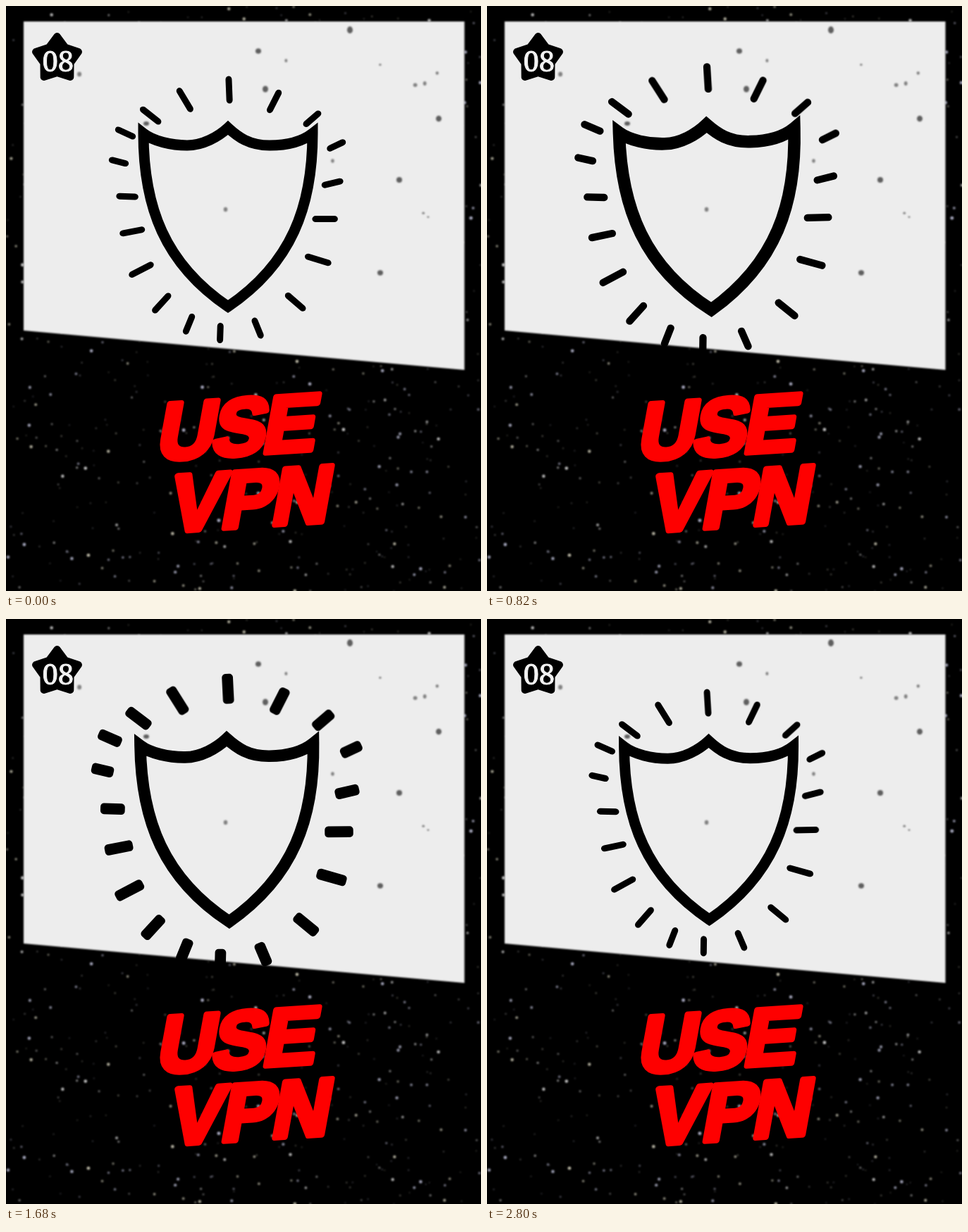
An HTML page that plays this animation: 674 px wide and 831 px high, repeating every 2.82 s.

```html
<!DOCTYPE html>
<html lang="en">
<head>
<meta charset="utf-8">
<title>Use VPN</title>
<style>
  html, body { margin: 0; width: 100%; height: 100%; overflow: hidden; background: #000; }
  svg { display: block; width: 674px; height: 831px; }
  .soft { filter: blur(.8px); }
  .badge { font: 40px "Noto Serif", "Liberation Serif", serif; fill: #f2f2f2; stroke: #f2f2f2; }
  .title text {
    font: bold 114px "Liberation Sans", Arial, sans-serif;
    letter-spacing: -4px; font-kerning: none;
    fill: #fe0000; stroke: #fe0000; stroke-width: 8; stroke-linejoin: round;
  }
</style>
</head>
<body>
<svg viewBox="0 0 674 831">
  <rect width="674" height="831"/>
  <g id="stars" class="soft"></g>
  <path class="soft" fill="#ededed" d="M25 22H650.5V517L25 461Z"/>
  <g id="specks" class="soft"></g>
  <path id="badge" stroke="#000" stroke-width="10" stroke-linejoin="round"/>
  <text class="badge" x="51.5" y="92.5">08</text>
  <path id="shield" fill="none" stroke="#000" d="
    M195 181C209 192 235 198 257 198S301 186 315 173C329 186 345 198 374 198S421 192 435 181
    C435 285 405 366 315 427C225 366 195 285 195 181Z"/>
  <g id="rays"></g>
  <g class="title">
    <text transform="translate(211 645) rotate(-3.7) skewX(-14)">USE</text>
    <text transform="translate(228 747) rotate(-3.7) skewX(-14)">V<tspan dx="2">PN</tspan></text>
  </g>
</svg>
<script>
const byId = id => document.getElementById(id);

function add(parent, tag, attrs) {
  const el = document.createElementNS('http://www.w3.org/2000/svg', tag);
  for (const k in attrs) el.setAttribute(k, attrs[k]);
  return parent.appendChild(el);
}

let seed = 4711;
const rnd = (from = 0, to = 1) =>
  from + (to - from) * (seed = seed * 16807 % 2147483647) / 2147483647;

// Night sky: many faint dots, few bright ones
const tints = ['#fff', '#f4f0d8', '#d6d8f4'];
for (let i = 0; i < 800; i++) {
  const glow = rnd() ** 2;
  add(byId('stars'), 'circle', {
    cx: rnd(0, 674), cy: rnd(0, 831), r: 1.2 + 1.3 * glow,
    opacity: .15 + .6 * glow, fill: tints[i % 3]
  });
}

// Dust on the card
function speck(x, y, size, opacity) {
  add(byId('specks'), 'ellipse', { cx: x, cy: y, rx: size, ry: size * rnd(.7, 1.3), opacity });
}
[[488, 34], [358, 64], [368, 118], [199, 167], [558, 247], [614, 160], [531, 379]]
  .forEach(([x, y]) => speck(x, y, 4, .6));
for (let i = 0; i < 12; i++) speck(rnd(60, 630), rnd(50, 450), rnd(1.5, 3), .45);

// Badge
byId('badge').setAttribute('d', 'M' + Array.from({ length: 10 }, (_, i) => {
  const r = i % 2 ? 20 : 32, a = Math.PI * i / 5;
  return [72.5 + r * Math.sin(a), 75 - r * Math.cos(a)];
}).join('L') + 'Z');

// Rays: spread around the shield, bulging at its upper corners; angles run clockwise from the top
const { sin, cos, PI } = Math;
const CX = 315, CY = 292, COUNT = 19, DEG = PI / 180;
const rays = Array.from({ length: COUNT }, (_, i) => {
  const even = 2 * PI * i / COUNT;
  const a = even + (6 - 6 * cos(even - 24 * DEG) + 4.5 * sin(3 * even)) * DEG;
  const fromTop = Math.acos(cos(a)) / DEG;
  const r = 155 + 18 * cos(2 * a) + 34 * Math.exp(-(((fromTop - 56) / 20) ** 2));
  const lean = a + (10 * sin(2 * a) - 3) * DEG;
  const len = 25 + 5 * cos(PI * i / 3);
  return {
    x: r * sin(a), y: -r * cos(a), dx: len * sin(lean), dy: -len * cos(lean),
    el: add(byId('rays'), 'rect', { rx: 5 })
  };
});

// Smooth rise and fall between two steps
function pulse(step, from, to) {
  const k = Math.min(1, Math.max(0, (step - from) / (to - from)));
  return sin(PI * k) ** 2;
}

// Steps come in threes, held for 20, 100 and 20 ms
function stepAt(t) {
  const r = t % 140;
  return Math.floor(t / 140) * 3 + (r < 20 ? 0 : r < 120 ? 1 : 2);
}

function drawShield(step) {
  const beat = pulse(step, 5, 45);
  const k = Math.max(0, (step - 5) / 12);
  const turn = -1.5 * k * Math.exp(1 - k);
  byId('shield').setAttribute('stroke-width', 15 + 3 * beat);
  byId('shield').setAttribute('transform',
    `translate(315 303) rotate(${turn}) scale(${1 + .055 * beat}) translate(-315 -303)`);
}

function drawRays(step) {
  const grow = .265 * pulse(step, 8, 46);
  const sx = 1 + grow, sy = 1 + .8 * grow;
  const width = 9 + 8 * pulse(step, 12, 50);
  const turn = -.6 * (1 - cos(2 * PI * (step / 31) ** 1.42)); // a wobble that quickens
  byId('rays').setAttribute('transform', `translate(${CX} ${CY}) rotate(${turn})`);
  for (const { x, y, dx, dy, el } of rays) {
    const len = Math.hypot(dx * sx, dy * sy) + 9;
    const angle = Math.atan2(dy * sy, dx * sx) / DEG;
    el.setAttribute('x', -len / 2);
    el.setAttribute('y', -width / 2);
    el.setAttribute('width', len);
    el.setAttribute('height', width);
    el.setAttribute('transform', `translate(${x * sx} ${y * sy}) rotate(${angle})`);
  }
}

let shown = -1;
function tick() {
  const step = stepAt(performance.now() % 2820);
  if (step !== shown) {
    shown = step;
    drawShield(step);
    drawRays(step);
  }
  requestAnimationFrame(tick);
}
tick();
</script>
</body>
</html>
```
